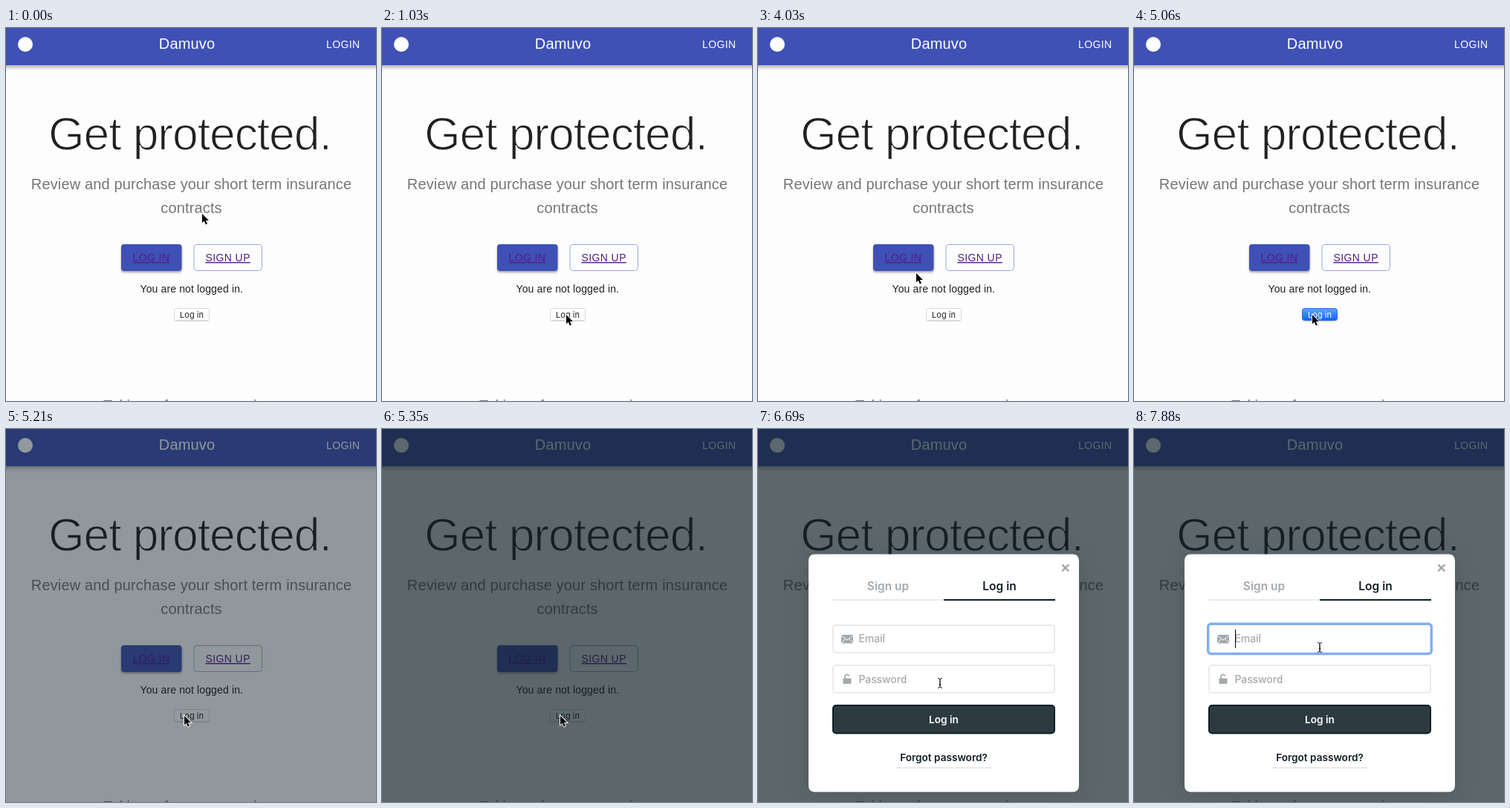
Recreate the animation shown at these times as an HTML page. Size 498x502 px, loop 8000 ms.

```html
<!DOCTYPE html>
<html lang="en">
<head>
<meta charset="utf-8">
<title>Get protected</title>
<style>
  html, body { margin: 0; width: 100%; height: 100%; overflow: hidden; background: #fdfdfd; }
  svg { display: block; width: 498px; height: 502px; }
  text { font-family: "Liberation Sans", Arial, sans-serif; }
  .mid { text-anchor: middle; }
  .caps { font-size: 14px; letter-spacing: .4px; }
  .sub { font-size: 20px; letter-spacing: .15px; fill: #767676; }
  .link { fill: #551a8b; text-decoration: underline; }
  .ui, #modal text { font-family: Inter, Roboto, sans-serif; }
  .tab { font-size: 15.5px; font-weight: 600; }
  .hint { font-size: 14px; font-weight: 500; letter-spacing: -.1px; fill: #a3a9ac; }
  .bold { font-size: 13.6px; font-weight: 600; }
  .field { fill: #fff; stroke: #e9ebeb; stroke-width: 2; }
  #bar { filter: drop-shadow(0 2px 3px rgba(0, 0, 0, .4)); }
  #enter { filter: drop-shadow(0 2px 1.5px rgba(0, 0, 0, .35)); }
  #card { filter: drop-shadow(0 4px 14px rgba(14, 30, 37, .16)); }
</style>
</head>
<body>
<svg viewBox="0 0 498 502">
  <defs>
    <linearGradient id="blue" x2="0" y2="1">
      <stop stop-color="#5ea6fb"/>
      <stop offset="1" stop-color="#0f63ee"/>
    </linearGradient>
  </defs>

  <rect width="498" height="502" fill="#fdfdfd"/>
  <rect id="bar" x="-10" y="-10" width="518" height="60" fill="#3f51b5"/>
  <circle cx="26" cy="22" r="10" fill="#fff"/>
  <text class="mid" x="243.5" y="28" font-size="20" letter-spacing=".15" fill="#fff">Damuvo</text>
  <text class="caps" x="431" y="27" fill="#fff">LOGIN</text>

  <text x="57" y="164.4" font-size="62.5" letter-spacing="-1.1" fill="#212121" stroke="#fdfdfd" stroke-width="1.4">Get protected.</text>
  <text class="sub mid" x="249.5" y="217">Review and purchase your short term insurance</text>
  <text class="sub mid" x="249.5" y="249">contracts</text>
  <text class="sub" x="131" y="514.5">Taking a few more savings</text>

  <rect id="enter" x="155" y="291" width="81.5" height="36" rx="4"/>
  <text class="caps link" x="170.5" y="314">LOG IN</text>
  <rect x="253" y="291.5" width="91.5" height="35" rx="4" fill="none" stroke="#9fa8da"/>
  <text class="caps link" x="268.5" y="314">SIGN UP</text>
  <text class="mid" x="249.8" y="356" font-size="14" letter-spacing=".13" fill="#212121">You are not logged in.</text>
  <rect x="226.5" y="378" width="47" height="16.5" rx="3" fill="none" stroke="#b5b5b5" opacity=".5"/>
  <rect id="small" x="226.5" y="377.5" width="47" height="16" rx="3"/>
  <text id="smallText" class="ui mid" x="250" y="390" font-size="11">Log in</text>

  <rect id="shade" width="498" height="502" fill="#0e1e25"/>

  <g id="modal">
    <rect id="card" x="68" y="168.5" width="364" height="320" rx="8" fill="#fff"/>
    <path d="M409.3 182.3l9 9m0-9l-9 9" stroke="#a3a9ac" stroke-width="2.4"/>
    <text class="tab mid" x="175" y="217" fill="#a3a9ac">Sign up</text>
    <text class="tab mid" x="325" y="217" fill="#0e1e25">Log in</text>
    <path d="M100 230h150M185 456h130" stroke="#e9ebeb" stroke-width="2"/>
    <path d="M250 230h150" stroke="#0e1e25" stroke-width="2"/>

    <rect class="field" x="101" y="264" width="298" height="37" rx="4"/>
    <rect id="ring" x="99.7" y="262.2" width="300.6" height="40.3" rx="4" fill="#fff" stroke="#82aef4" stroke-width="3.4"/>
    <rect x="112" y="277" width="16" height="11.5" rx="1" fill="#a3a9ac"/>
    <path d="M112 278l8 6 8-6M112 288l5.5-5.5M128 288l-5.5-5.5" fill="none" stroke="#fff"/>
    <text class="hint" x="135.5" y="287.3">Email</text>
    <rect id="caret" x="136" y="270" width="1" height="25"/>

    <rect class="field" x="101" y="318" width="298" height="37" rx="4"/>
    <rect x="114.5" y="335.5" width="11" height="7.5" rx="1" fill="#a3a9ac"/>
    <path d="M117 336v-2.5a3 3 0 0 1 5.8-1" fill="none" stroke="#a3a9ac" stroke-width="1.8"/>
    <text class="hint" x="135.5" y="341.6">Password</text>

    <rect x="101" y="372" width="298" height="37.5" rx="4" fill="#2d3b41" stroke="#0e1e25" stroke-width="2"/>
    <text class="bold mid" x="250" y="395.5" fill="#fff">Log in</text>
    <text class="bold mid" x="250" y="447.3" fill="#0e1e25">Forgot password?</text>
  </g>

  <path id="arrow" d="M0 0V12.3l2.8-2.6 2 4.7 2.1-.9-2-4.5H9Z" stroke="#fff" stroke-width="1.8" paint-order="stroke"/>
  <path id="beam" d="M-3-6.5q3 0 3 2V4.5q0 2-3 2M3-6.5q-3 0-3 2V4.5q0 2 3 2M-1.5 2h3" fill="none" stroke="#222"/>
</svg>
<script>
  const LOOP = 8000;
  const $ = id => document.getElementById(id);
  const set = (id, name, value) => $(id).setAttribute(name, value);
  const show = (id, on) => set(id, 'visibility', on ? 'visible' : 'hidden');

  // Pointer stops: time, x, y
  const stops = [
    [0, 264, 250], [300, 262, 258], [450, 254, 284], [600, 247, 318],
    [750, 245, 352], [880, 246, 376], [1030, 248, 386],
    [3280, 247.5, 385.5], [3430, 239, 364], [3580, 221, 334], [3730, 206, 317],
    [3880, 203, 312], [4030, 213, 330], [4170, 233, 366], [4320, 241, 386],
    [4610, 240.5, 387], [4760, 240, 386.5], [4910, 240, 386],
    [6540, 241, 378], [6690, 245, 342], [6840, 250, 300], [6990, 250, 294]
  ];
  const between = (t, a, b) => t >= a && t < b;

  function draw(t) {
    const [, x, y] = stops.filter(s => s[0] <= t).pop();
    const isBeam = t >= 6690;
    show('arrow', !isBeam);
    show('beam', isBeam);
    set(isBeam ? 'beam' : 'arrow', 'transform', `translate(${x} ${y})`);

    const hover = x > 155 && x < 236 && between(y, 291, 327);
    set('enter', 'fill', hover ? '#303f9f' : '#3f51b5');

    const pressed = between(t, 5060, 5210);
    set('small', 'fill', pressed ? 'url(#blue)' : '#fff');
    set('small', 'stroke', pressed ? '#2a6fdc' : '#d8d8d8');
    set('smallText', 'fill', pressed ? '#fff' : '#222');

    set('shade', 'opacity', t < 5210 ? 0 : t < 5350 ? .45 : .67);

    const open = t >= 5800;
    set('modal', 'display', open ? 'inline' : 'none');
    set('modal', 'transform', t < 5950 ? 'translate(-2.4 -4.1) scale(1.0096)' : '');
    show('ring', t >= 6990);
    show('caret', open && (between(t, 6990, 7440) || t >= 7880));
  }

  function tick() {
    draw(performance.now() % LOOP);
    requestAnimationFrame(tick);
  }
  tick();
</script>
</body>
</html>
```
